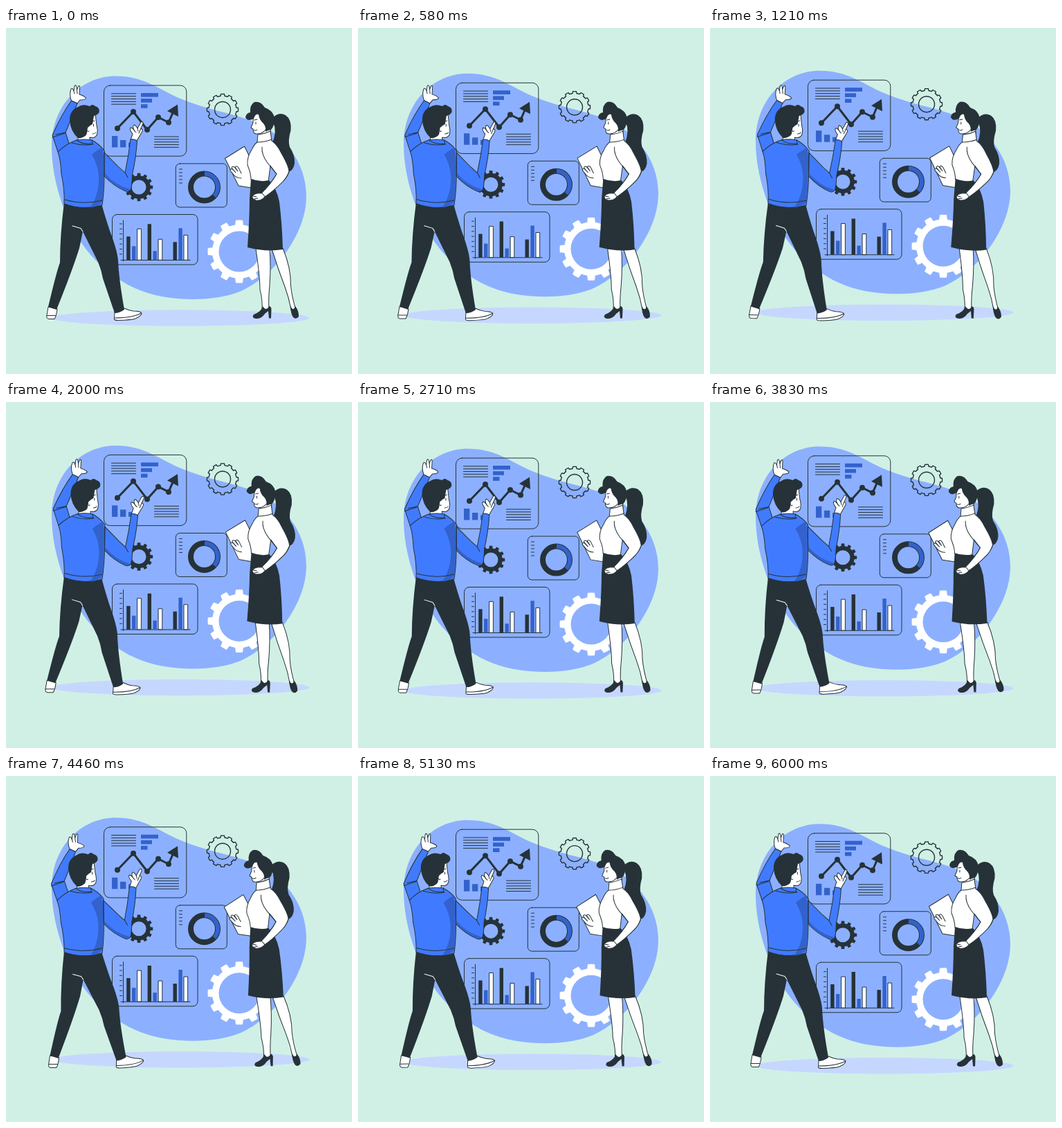
An HTML page for the animation above (6040 ms loop, 500 px wide and 500 px high).

```html
<!DOCTYPE html>
<html lang="en">
<head>
<meta charset="utf-8">
<title>Data report</title>
<style>
html, body { margin: 0; height: 100%; overflow: hidden; background: #d0f0e5 }
svg { display: block; width: 100vw; height: 100vh; stroke-linecap: round; stroke-linejoin: round }
.line { fill: none; stroke: #263238; stroke-width: 1 }
.dark { fill: #263238 }
.deep { fill: #3362cc }
.white { fill: #fff }
.cloth { fill: #407bff; stroke: #263238 }
.skin { fill: #fff; stroke: #263238 }
</style>
</head>
<body>
<svg viewBox="0 0 500 500">
  <g id="air">
    <path fill="#8cb0ff" d="M158 69.5C200 69.5 220 88.5 252 102C290 118 322 122 352 133C402 151 434 195 434 243C434 300 385 360 340 380C310 393 265 395 225 388C170 378 130 342 108 309C85 275 66 220 66 172C66 110 110 69.5 158 69.5Z"/>
    <ellipse cx="252" cy="419" rx="186.5" ry="11.7" fill="#c6d7ff"/>
    <g id="gears"></g>
    <g class="line">
      <rect x="141.5" y="83" width="119.3" height="102.2" rx="9"/>
      <rect x="245.3" y="196" width="74" height="63" rx="6"/>
      <rect x="153.5" y="269.5" width="123.5" height="72.5" rx="7"/>
      <path d="M169.5 278V337M166 335.5H266"/>
      <path id="rules"/>
      <path stroke-width="3" d="M161 145L184 121L204 147L220 129L235 136.5L243 118"/>
      <circle cx="286.5" cy="230" r="19.5" stroke-width="8"/>
      <path stroke="#3362cc" stroke-width="6" stroke-linecap="butt" d="M287 210.5A19.5 19.5 0 0 1 301 243"/>
    </g>
    <path class="dark" d="M248 110.5L233 120L249 128Z"/>
    <g id="marks"></g>
  </g>

  <g id="man">
    <path class="skin" d="M61 403L59 415Q58 420 62 420.5L70 420.5Q73 416 74 406Z"/>
    <path class="skin" d="M157 411L156.5 421Q157 422.5 162 422.5Q181 422 187 420Q196 416 196 412Q194 409 184 409Q177 408 171 405Z"/>
    <path class="line" d="M59 415.5H71.5M157 419Q183 419 195.5 412"/>
    <path class="dark" d="M84 252L138 254Q143 272 150 293Q161 322 162 336Q163 362 171 407Q164 412 157 412L140 362Q138 350 133 338L111 294L106 318Q96 350 73 407L61 403Q73 352 78 339Q78 300 84 252Z"/>
    <path fill="none" stroke="#fff" d="M96 286L108 289.5L111 294"/>
    <path class="skin" d="M94.5 105Q91 96 94 88Q96 86 98 91L99 84Q101 81 102 86L102.5 89L104.5 84Q107 82 106.5 87L106 96Q113 98 115.5 101Q115 104 107 104L103 109Z"/>
    <path class="line" d="M98 91L99 95M102.5 89L103 95"/>
    <path class="cloth" d="M94.5 105L103 109Q96 127 86 151L92 170L75 179L67 155Q80 125 94.5 105Z"/>
    <path class="line" d="M67 158L85 152M72 154L86 151"/>
    <path class="skin" d="M104 150V163Q113 169 121 162L121 158Q129 160 131.5 154Q133 148 131 141L129 123L114 130Z"/>
    <path class="dark" d="M104 159Q93 149 92 133Q92 119 104 114Q111 109 121 113Q125 109 129 113Q136 115 134.5 122Q132 126 127 127L125 139L120 142Q117 143 117 148Q118 155 112 157.5Q108 160 104 159Z"/>
    <path class="line" d="M120 142Q117 143 117 147Q118 151 120 149M126.5 139V142M125 135L128 134M125 153Q128 153 130 151"/>
    <path class="cloth" d="M75 179Q87 167 102 162Q113 160 124 162Q134 167 142 177Q144 190 142 212Q142 235 139 256Q112 264 84 254Q85 234 80 211Q79 190 75 179Z"/>
    <path class="deep" d="M124 183Q132 176 139 173Q143 190 141 211Q141 236 138.5 252Q132 259 122 259Q135 240 134 214Q133 198 124 183Z"/>
    <path class="line" d="M102 162Q111 169 125 167L124 162M95 166Q112 171 126 168M85 248Q112 256 139 249"/>
    <path class="skin" d="M180 162L183 153Q178 147 180 144Q183 144 186 149Q182 143 185 140Q187 140 190 145L195 136Q198 134 198 138L195 145Q199 147 196 151L189 163Z"/>
    <path class="line" d="M186 149L188 151M190 145L191 149M195 145L192 152"/>
    <path class="cloth" d="M142 180Q156 194 163 201L172 209Q177 186 180 161Q185 160 189.5 163Q188 187 182.5 212Q182 229 180 234Q177 237 173 236Q156 229 142 214Z"/>
    <path class="deep" d="M143 210Q157 227 179 233Q178 236 173 235.5Q156 228 143 213.5Z"/>
    <path class="line" d="M172 209L176 216M142 180V213"/>
  </g>

  <g id="woman">
    <path class="dark" d="M386 129Q395 121 404 126Q413 132 411.5 148Q407 163 410 172Q418 184 417 196Q415 207 407 208Q399 203 391 190Q382 180 385 166Q392 149 386 136Z"/>
    <path class="skin" d="M361 319Q367 360 367 378Q371 394 370 407L380 406Q379 392 381 372Q383 344 381 319ZM384 319Q393 348 403 374Q409 390 412 407L418.5 406Q413 388 411.5 372Q412 347 400 318Z"/>
    <path class="dark" d="M371 402Q369 410 358 414Q355 418 359 419.5Q368 422 374 413L379 409L380 419.5H383L383.5 406Q383 402 380 402Q376 410 371 402ZM411 401Q411 412 415 418Q419 422 423 417Q423.5 409 418 402Q415 411 411 401Z"/>
    <path class="skin" d="M316.5 188.5L344.5 171L358 198V231.5L336 228Z"/>
    <path class="skin" d="M340 217Q333 217 329 212L324 206Q324 203 327 204L332 209L326 202Q327 199 330 201L335 207L331 201Q333 198 336 202L340 210"/>
    <path class="skin" d="M366 145V163H383L382 142Z"/>
    <path class="skin" d="M359 120Q357 131 357 137L354 144L357 146Q357 153 362 153Q371 153 375 147L383 145V122Z"/>
    <path class="dark" d="M346 129Q347 123 353 122Q352 111 359 107Q368 105 374 115Q386 119 388 130Q388 142 383 147Q378 148 375 150Q376 143 372 138Q366 133 365 125Q361 123 358 131Q349 136 346 129Z"/>
    <path class="line" d="M361 136V139M359 133L363 132M358 147.5Q361 149 363 147"/>
    <path class="skin" d="M364 154Q374 153 382 149L384 163Q392 168 398 181Q409 200 409 208Q407 214 400 222Q385 236 374 244L369 238Q383 225 391 211L382 199L379 222Q367 225 354 219Q354 210 349 198Q348 187 355 176Q358 169 363 165Z"/>
    <path class="line" d="M363 165Q374 165 384 161M370 172Q369 183 378 195L391 211"/>
    <path class="dark" d="M354 218Q368 223 380 220Q391 231 395 251Q399 283 400 320Q376 324 349 317Q352 275 352 247Z"/>
    <path class="skin" d="M409 207Q406 216 400 222Q386 236 374 244Q369 250 361 249Q355 247 356 243Q360 238 369 239Q384 224 391 211"/>
    <path class="line" stroke-width="2" d="M370 238.5L374 243.5"/>
    <path class="line" d="M357 243L362 244M359 247L364 246"/>
  </g>
</svg>
<script>
const LOOP = 6040;
const el = id => document.getElementById(id);

// Toothed ring; the second subpath cuts the hole.
function gear(x, y, body, outer, hole, style) {
  const at = (r, a) => `${x + r * Math.sin(a)} ${y - r * Math.cos(a)}`;
  let d = '';
  for (let i = 0; i < 12; i++) {
    const a = i * Math.PI / 6;
    d += (i ? `A${body} ${body} 0 0 1 ` : 'M') + at(body, a - .15);
    d += `L${at(outer, a - .11)}A${outer} ${outer} 0 0 1 ${at(outer, a + .11)}L${at(body, a + .15)}`;
  }
  d += `A${body} ${body} 0 0 1 ${at(body, -.15)}Z`;
  d += `M${x - hole} ${y}a${hole} ${hole} 0 1 0 ${2 * hole} 0a${hole} ${hole} 0 1 0 ${-2 * hole} 0Z`;
  return `<path fill-rule="evenodd" d="${d}" ${style}/>`;
}
el('gears').innerHTML =
  gear(313, 118, 20, 22.6, 11.5, 'class="line" style="stroke-width:1.4"') +
  gear(192, 230, 16.8, 20.3, 10.5, 'class="dark"') +
  gear(337, 323, 39, 45.5, 29.5, 'class="white"');

const rules = (x, y, width, gap, count) =>
  Array.from({ length: count }, (_, i) => `M${x} ${y + i * gap}h${width}`).join('');
el('rules').setAttribute('d',
  rules(152.5, 94.8, 35, 3.85, 5) + rules(214.5, 157, 35, 3.85, 5) +
  rules(250.5, 204, 4, 5, 5) + rules(164.5, 283, 3, 7.3, 7));

const box = (kind, x, y, w, h) => `<rect class="${kind}" x="${x}" y="${y}" width="${w}" height="${h}"/>`;
const kinds = ['dark', 'deep', 'skin'];
let marks = '';
[[161, 145], [184, 121], [204, 147], [220, 129], [235, 136.5]].forEach(([x, y]) =>
  marks += `<circle class="dark" cx="${x}" cy="${y}" r="4"/>`);
[25, 16, 9.5].forEach((w, i) => marks += box('deep', 195, 94 + i * 8.1, w, 5.6));
[16.5, 10.5, 7].forEach((h, i) => marks += box('deep', 153 + i * 12, 172.5 - h, 8.3, h));
[[174.2, 34, 20, 45], [204.6, 52, 13, 30], [241.5, 26, 46, 36]].forEach(([x, ...heights]) =>
  heights.forEach((h, i) => marks += box(kinds[i], x + i * 7.9, 335.3 - h, 5.4, h)));
el('marks').innerHTML = marks;

// Triangle wave: 0, 1, 0, -1, 0 over one turn.
const wave = p => 1 - Math.abs(((p + .25) % 1) * 4 - 2);

function draw(now) {
  const swing = wave(now % LOOP / LOOP);
  el('air').setAttribute('transform', `translate(0 ${-9.7 * Math.abs(swing)})`);
  el('man').setAttribute('transform', `rotate(${swing} 127.5 252.5)`);
  el('woman').setAttribute('transform', `rotate(${swing} 370 263)`);
}
const start = performance.now();
function tick() {
  draw(performance.now() - start);
  requestAnimationFrame(tick);
}
tick();
</script>
</body>
</html>
```
